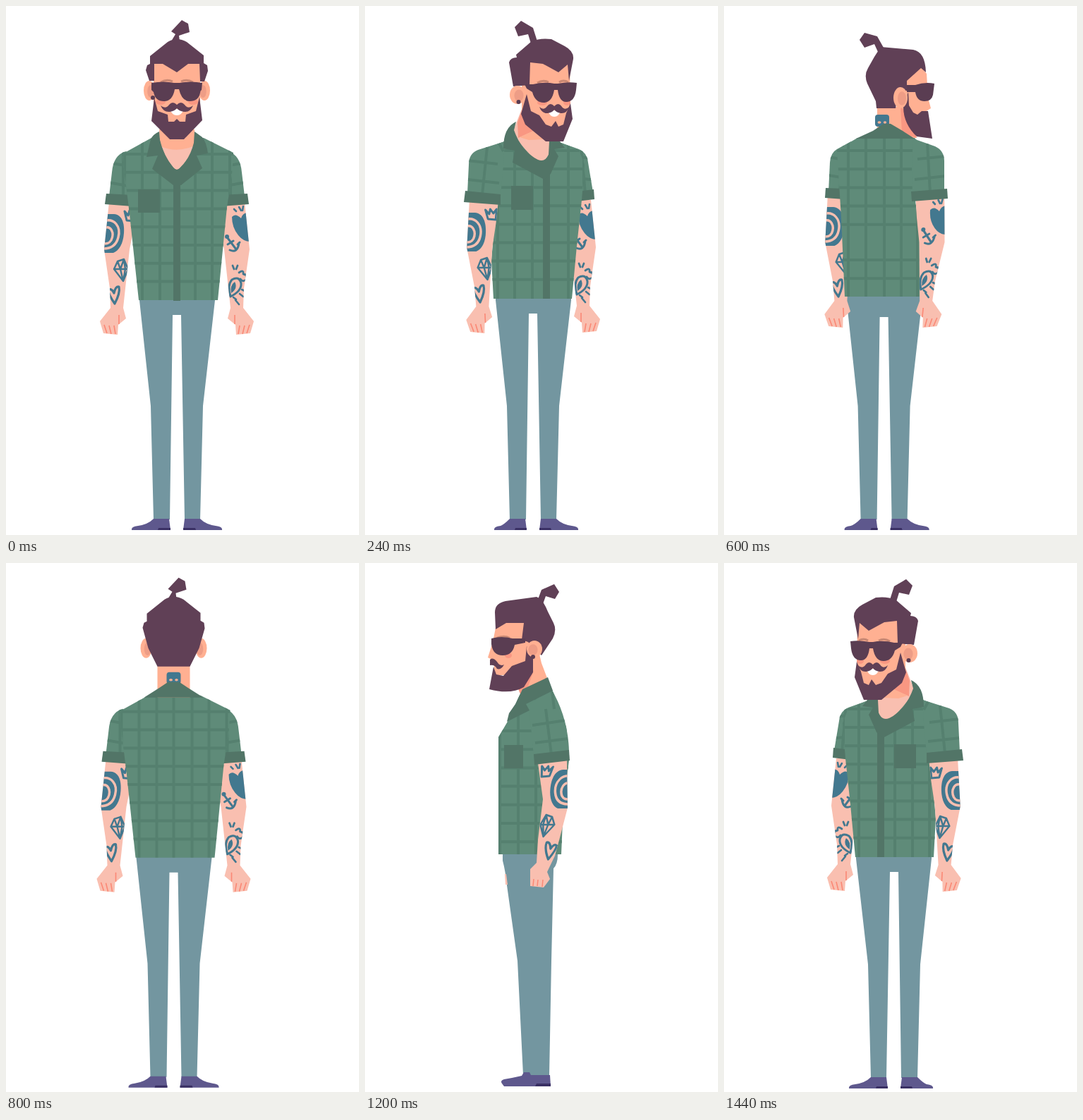
Animation, 500 px wide and 750 px high, one loop 1.6 s. Source, as an HTML page:

```html
<!DOCTYPE html>
<html lang="en">
<head>
<meta charset="utf-8">
<title>Turnaround</title>
<style>
html, body { margin: 0; width: 100%; height: 100%; overflow: hidden; background: #fff; }
svg { display: block; width: 100vw; height: 100vh; }
</style>
</head>
<body>
<svg id="stage" viewBox="0 0 500 750"></svg>
<script>
const HAIR = '#604056', GLASS = '#5a3d52', SKIN = '#f9bfb0', FACE = '#ffb092', BLUSH = '#f99782',
  EAR = '#ee9d86', SHIRT = '#5f8b79', TRIM = '#527567', PLAID = '#55806f', JEANS = '#7396a0',
  SHOE = '#5e588d', SOLE = '#3a3064', INK = '#43788f', NAIL = '#fb8875', BROW = '#c98873';

let clips = 0;
const fill = (d, c) => `<path d="${d}" fill="${c}"/>`;
const line = (d, c, w) => `<path d="${d}" fill="none" stroke="${c}" stroke-width="${w}"/>`;
const oval = (x, y, rx, ry, c) => `<ellipse cx="${x}" cy="${y}" rx="${rx}" ry="${ry}" fill="${c}"/>`;
const move = (m, s) => `<g transform="matrix(${m})">${s}</g>`;
const flip = (sum, s, dy = 0) => move(`-1 0 0 1 ${sum} ${dy}`, s);
const cut = (d, c, inner) => {
  const id = 'c' + clips++;
  return `<clipPath id="${id}"><path d="${d}"/></clipPath>${fill(d, c)}<g clip-path="url(#${id})">${inner}</g>`;
};
const checks = (xs, y0, gap, n) => {
  let d = xs.map(x => `M${x},150V420`).join('');
  for (let i = 0; i < n; i++) d += `M100,${y0 + i * gap}H400`;
  return line(d, PLAID, 4);
};
const cloth = (d, lines) => cut(d, SHIRT, line(lines, PLAID, 4));

// Tattoos
const ink = (d, w = 3) => `<path d="${d}" fill="none" stroke="${INK}" stroke-width="${w}" stroke-linecap="round" stroke-linejoin="round"/>`;
const swirlInk =
  fill('M138,295H153C164,296 168,307 167,322C166,337 160,347 152,350H138Z', INK) +
  line('M138,305C154,300 163,313 159,328C156,340 148,344 138,344', SKIN, 3.4) +
  line('M138,315C149,310 154,322 149,332C146,337 142,337 138,337', SKIN, 3.4) +
  ink('M168,291L171,304L182,305L184,290L179,296L175,290L173,297Z') +
  ink('M153,373L158,362L167,359L173,373L166,390ZM153,373L173,373M158,362L162,373L166,390M167,359L162,373M167,359L169,373L166,390', 2.4) +
  ink('M154,422Q145,409 145,403Q149,399 153,407Q155,397 160,398Q162,407 154,422Z', 3.2);
const heartInk =
  ink('M323,288L326,291M330,285L333,290M336,284L335,290', 2.6) +
  fill('M320,299Q325,293 333,301Q335,294 341,293L348,295V334Q337,335 329,325Q320,314 320,299Z', INK) +
  oval(313, 327, 3, 3, INK) + ink('M314,329L326,345M314,338L322,333M317,346Q328,351 330,336M328,338L331,335', 3) +
  ink('M321,368L323,373M328,368L326,373M330,378Q337,373 336,380Q343,381 340,388Q335,392 332,387', 2.8) +
  ink('M318,412Q313,396 320,388Q330,382 333,393Q334,404 318,412Z') +
  fill('M319,407Q317,396 324,391Q329,400 319,407Z', INK) +
  ink('M334,402L338,404M331,408L336,412M325,417L330,423M322,413L326,416', 2.6);

// Arms
const ARM = 'M146,278H187L182,310L175,345L166,428L170,443L159,452L158,466L138,464L133,447L148,428L147,400L139,345Z';
const FINGERS = line('M139,452L143,464M146,453L149,465M153,453L155,465M160,438V451', NAIL, 1.6);
const swirlArm = m => move(m, cut(ARM, SKIN, swirlInk) + FINGERS);
const heartArm = m => move(m, flip(484, cut(ARM, SKIN, flip(484, heartInk)) + FINGERS));

// Legs for every view but the profile; toe shortens the left shoe
const shoe = (toe, s) =>
  fill(`M${178 + toe},743Q${177 + toe},738 ${187 + toe},737Q201,735 209,727H231L233,743Z`, SHOE) +
  fill(`M${233 - s},743L${234 - s},740H233V743Z`, SOLE);
const legs = (dx, crotch, toe, s1, s2) => move(`1 0 0 1 ${dx} 0`,
  fill(`M189,410H296V417L279,567L275,728H253L248,${crotch}H236L232,728H209L205,567L189,417Z`, JEANS) +
  shoe(toe, s1) + flip(484, shoe(0, s2)));

const MOUTH = fill('M232,146H252Q249,155 242,155Q235,155 232,146Z', '#fff') +
  fill('M242,140Q236,134 231,140Q226,147 219,141Q223,151 232,150Q239,149 242,145Q245,149 252,150Q261,151 265,141Q258,147 253,140Q248,134 242,140Z', HAIR);
const ear = (x, y, rx, ry, k = 1) => oval(x, y, rx, ry, FACE) + oval(x + 2 * k, y + 1, rx * .6, ry * .65, EAR);
const stud = (x, y) => oval(x, y, 3, 3, GLASS);

const TORSO = 'M206,187L168,208L165,214L175,295L188,417H300L313,285L320,240L322,208L280,187Z';
const SLEEVE = 'M170,206Q152,211 150,236L146,270H180V214Z';
const straightSleeves = () => {
  const one = cloth(SLEEVE, 'M145,222L168,226M145,250L172,255M166,205V270') +
    fill('M142,266L179,268V284L140,281Z', TRIM);
  return one + flip(484, one);
};

function front() {
  return legs(0, 438, 0, 18, 18) + swirlArm('1 0 0 1 0 0') + heartArm('1 0 0 1 0 0') + straightSleeves() +
    cut(TORSO, SHIRT, checks([168, 193, 218, 268, 292, 317], 210, 25.8, 8)) +
    fill('M237,245H247V418H237Z', TRIM) + fill('M187,260H218V293H187Z', TRIM) +
    fill('M217,176H267L266,200Q260,216 246,230Q242,234 238,230Q223,214 217,186Z', SKIN) +
    fill('M217,175H267V198Q242,209 219,199Z', FACE) +
    fill('M217,178Q208,182 205,189L199,214L215,212L207,231L237,254H248L278,230L270,212L286,209Q284,193 278,186L267,178L266,194Q261,215 247,229Q242,235 237,229Q223,212 218,190Z', TRIM) +
    ear(203, 120, 8, 14) + ear(281, 120, 8, 14, -1) +
    fill('M209,78H275V150L255,172H229L209,150Z', FACE) +
    fill('M249,20L258,25L260,37L245,42L246,50H234L240,40L234,36Z', HAIR) +
    fill('M204,71L229,51Q242,43 256,51L280,70V81L285,84L286,92L281,107H275L274,82H258L242,94L222,82H210V106H203L198,91L200,84L204,82Z', HAIR) +
    oval(219, 136, 7, 4, BLUSH) + oval(265, 136, 7, 4, BLUSH) +
    line('M219,108Q228,103 236,107M248,107Q256,103 265,108', BROW, 3) +
    fill('M206,109Q224,106 238,109H246Q262,106 278,109L277,119Q275,120 275,123Q273,135 260,135Q249,135 245,118H239Q236,135 224,135Q211,135 209,122L206,119Z', GLASS) +
    stud(208, 130) +
    fill('M210,130L215,149L229,154L230,164H238L242,160L246,164H254L255,154L269,149L274,129L278,162L252,189H232L206,163Z', HAIR) + MOUTH;
}

function threeQuarter() {
  return legs(-4, 436, 9, 17, 17) + heartArm('1 0 0 1 -18 -3') +
    cloth('M275,193L303,203Q315,208 316,222L323,264L300,268Z', 'M296,212L318,216M296,243L325,247M306,200L312,266') +
    fill('M300,263L324,260L325,274L300,277Z', TRIM) +
    cut('M200,191L160,206L186,282L179,360L182,415H293L300,340L307,275L311,225L303,204L275,193Z', SHIRT,
      checks([188, 212, 237, 288, 310], 205, 26.1, 8)) +
    fill('M252,235H262V415H252Z', TRIM) + fill('M207,255H238V289H207Z', TRIM) +
    swirlArm('1 0 .05 1 -12 -2') +
    cloth('M198,192L160,204Q147,209 147,225L145,266L192,270L196,225Z', 'M145,219L188,224M145,246L190,251M173,200L166,268M190,195L196,206') +
    fill('M142,262L192,267V282L140,278Z', TRIM) +
    fill('M211,174L222,146L262,185L261,208Q257,219 250,220Q235,218 211,182Z', SKIN) +
    fill('M223,146L241,176L217,187L216,165Z', BLUSH) + fill('M241,176L254,189L232,190L219,186Z', FACE) +
    fill('M214,164Q196,172 196,202L212,205L209,222L254,246L263,238L274,213L268,203L283,201L276,192H261L260,211Q255,222 245,218Q222,207 211,176Z', TRIM) +
    fill('M232,78H290L291,150L280,175H250L222,150V110H232Z', FACE) +
    fill('M212,30L221,21L238,31L244,50L235,53L231,40L217,43Z', HAIR) +
    fill('M214,69L236,50Q248,45 264,47L283,57Q296,64 295,75L289,106L287,83L274,94L252,82L234,80L233,112L210,114L204,80Q206,73 215,73Z', HAIR) +
    ear(216, 126, 11, 13) + stud(217.5, 136) +
    oval(251, 137, 7, 4, BLUSH) + oval(286, 137, 5, 4, BLUSH) +
    line('M244,109Q252,104 260,108M275,108Q281,104 288,108', BROW, 3) +
    fill('M226,111H238Q254,107 268,110H273Q288,107 300,109L299,119Q297,136 285,136Q275,136 273,119H268Q265,137 253,137Q241,137 237,122L229,117Z', GLASS) +
    fill('M229,125L235,149L247,155L256,168L264,171L270,163L274,171L281,168L285,152L291,138L294,160L281,192H256L227,168L221,153Z', HAIR) +
    move('.92 0 0 1 45.5 2', MOUTH);
}

function profile() {
  return fill('M198,412H276V425Q272,440 270,460L255,567L247,729H210L207,567L204,436Q198,430 198,416Z', JEANS) +
    fill('M271,444H273L272,459H269Z', SKIN) +
    fill('M209,729H236L238,725H246L249,730Q262,733 274,735Q280,737 277,741L274,745H208Z', SHOE) +
    fill('M208,741H228L230,745H208Z', SOLE) +
    cut('M207,180L249,184L268,226L282,250V416H193L190,345L182,283L186,235Z', SHIRT,
      checks([203, 229, 254, 280], 241, 26.2, 7)) +
    fill('M247,261H274V294H247Z', TRIM) +
    cut('M185,281L226,287L219,338L226,395L228,428L237,437V461L218,463L209,451L213,441L202,418L196,396L184,350Z', SKIN,
      move('1 0 .16 1 -10 1', swirlInk)) +
    line('M219,452L220,462M226,452L227,461M232,451L233,461', NAIL, 1.5) +
    cloth('M208,180Q183,222 182,271L232,277L236,235L240,205Z', 'M186,226L234,233M184,252L230,258M215,210L207,275M206,185L203,210') +
    fill('M182,268L232,274L231,289L181,283Z', TRIM) +
    fill('M225,128L240,140L256,176L250,191L213,166L221,145Z', FACE) +
    fill('M232,155L256,176L250,191L240,178Z', BLUSH) +
    fill('M212,165L248,182L258,203L267,216L270,228L238,212L243,203L205,184Z', TRIM) +
    fill('M244,84H274L286,95L290,115L297,137L289,141L287,162H270L238,150V112Z', FACE) +
    fill('M196,44L203,33L221,41L227,57L219,61L215,50L202,54Z', HAIR) +
    fill('M228,51L272,57Q287,60 287,73L286,97L271,88H246L249,112L240,115L221,134L205,110Q199,98 204,88L212,72Q219,54 228,51Z', HAIR) +
    oval(268, 134, 5, 4, BLUSH) +
    line('M266,109Q274,105 284,109', BROW, 2.5) +
    fill('M244,110H262Q278,106 292,110V118Q290,134 276,134Q262,134 259,119L244,116Z', GLASS) +
    fill('M242,121L244,142L263,149L275,163L285,161L289,150L295,182Q265,190 246,179L233,158V135Z', HAIR) +
    ear(231, 125, 11, 12) + stud(233, 136) +
    fill('M274,147Q280,150 284,143Q290,136 294,140V148Q287,147 284,153Q278,155 274,147Z', HAIR);
}

const neckInk = x => `<rect x="${x}" y="154" width="20" height="17" rx="4" fill="${INK}"/>` +
  oval(x + 6, 165, 2.5, 1.8, FACE) + oval(x + 14, 165, 2.2, 1.8, FACE);

function rearQuarter() {
  return legs(-15.4, 441, 8, 10, 17) + swirlArm('1 0 .05 1 -13 -10') +
    cloth('M180,192L160,203Q151,208 150,222L148,264H172Z', 'M148,214L165,217M148,240L166,243M170,198L164,262') +
    fill('M144,258L170,259V274L143,272Z', TRIM) +
    cut('M189,187H270L290,210L271,275L277,330L279,412H171L166,300L160,204Z', SHIRT,
      checks([176, 201, 227, 251, 274], 205, 26.2, 5) + checks([], 360, 26.2, 2)) +
    heartArm('1 0 -.1 1 2 -10') +
    cloth('M268,188L299,199Q312,205 312,220V264L267,268L266,225Z', 'M274,217L314,213M270,246L314,241M288,195L292,265') +
    fill('M265,263L316,259L317,273L266,277Z', TRIM) +
    fill('M217,143H254L273,187H217Z', FACE) + fill('M250,143L259,150L273,187L252,180Z', BLUSH) + neckInk(214) +
    fill('M187,188L211,177L226,167H236L253,177L270,188Z', TRIM) +
    fill('M256,104L279,86L287,96L289,130L293,145L285,150L280,163L258,150Z', FACE) +
    fill('M192,48L199,38L217,43L226,59L218,65L213,54L199,59Z', HAIR) +
    fill('M222,58L268,62Q285,65 286,94L279,88L259,106V120L247,122L243,145H216L215,135L203,110Q198,98 204,88L213,72Z', HAIR) +
    fill('M259,112H271Q285,107 298,110L296,126Q294,135 284,135Q273,135 271,122H259Z', GLASS) +
    fill('M261,122L262,141L268,151L274,154L280,149H289L295,188L273,185Q253,166 254,140Z', HAIR) +
    ear(250, 130, 10, 15);
}

function back() {
  return move('1 0 0 1 -4.5 .8',
    legs(0, 438, 0, 18, 18) + swirlArm('1 0 0 1 0 0') + heartArm('1 0 0 1 0 0') + straightSleeves() +
    cut(TORSO, SHIRT, checks([168, 193, 218, 242, 268, 292, 317], 210, 25.8, 8)) +
    fill('M219,140H265V190H219Z', FACE) + neckInk(232) +
    fill('M200,190L222,176L234,168H250L262,176L284,190Z', TRIM) +
    ear(203, 120, 8, 14) + ear(281, 120, 8, 14, -1) +
    fill('M249,20L258,25L260,37L245,42L246,50H234L240,40L234,36Z', HAIR) +
    fill('M204,71L229,51Q242,43 256,51L280,70V81L285,84L286,92L278,120L265,146H219L206,120L198,91L200,84L204,82Z', HAIR));
}

const views = [front(), threeQuarter(), profile(), rearQuarter(), back(),
  flip(468, rearQuarter()), flip(471, profile(), -3), flip(479, threeQuarter(), 2)];
const stage = document.getElementById('stage');
const HOLD = 200, start = performance.now();
let shown = -1;

function draw(t) {
  const i = Math.floor(t / HOLD) % views.length;
  if (i !== shown) stage.innerHTML = views[shown = i];
}
function tick() {
  draw(performance.now() - start);
  requestAnimationFrame(tick);
}
tick();
</script>
</body>
</html>
```
